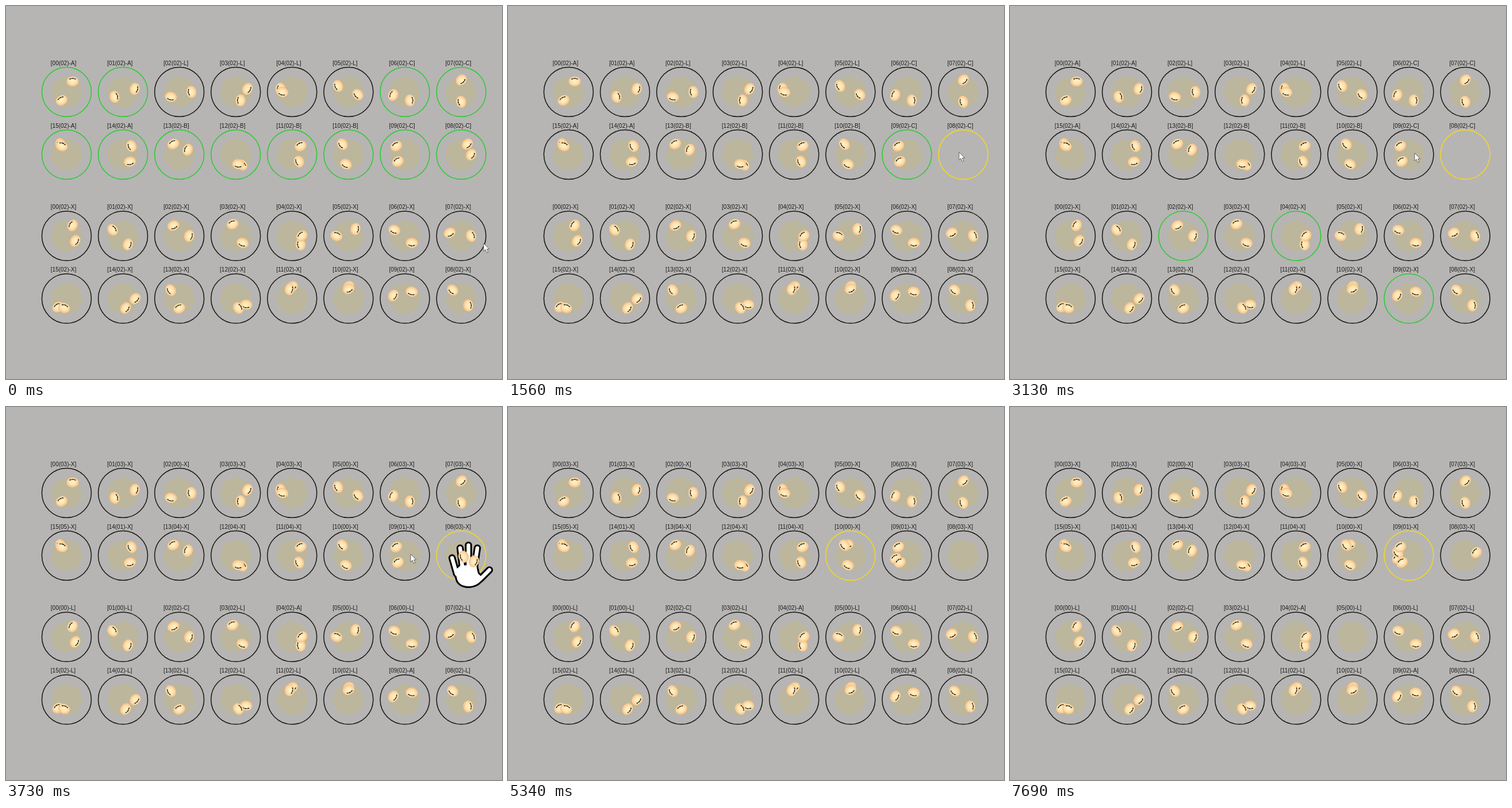
These frames come from a looping animation (863x649 px, 8 s). An HTML page:

```html
<!DOCTYPE html>
<html lang="en">
<head>
<meta charset="utf-8">
<title>Sowing game</title>
<style>
html, body { margin: 0; width: 100%; height: 100%; overflow: hidden; background: #b6b5b3; }
svg { display: block; width: 863px; height: 649px; }
text { font: 10px "Liberation Sans", Arial, sans-serif; fill: #1c1c1c; }
</style>
</head>
<body>
<svg id="stage" viewBox="0 0 863 649">
  <defs>
    <radialGradient id="skin" cx=".5" cy=".45" r=".58">
      <stop offset="0" stop-color="#fff2cb"/>
      <stop offset=".5" stop-color="#fde3b0"/>
      <stop offset="1" stop-color="#f4b87c"/>
    </radialGradient>
    <g id="bean">
      <ellipse rx="10.6" ry="8.8" fill="url(#skin)"/>
      <path d="M-5.5-3.8Q0-7 5.5-3.8" fill="none" stroke="#14100c" stroke-width="1.4" stroke-dasharray="3.2 .7 4.4 .6"/>
    </g>
    <path id="fingers" d="M-16 4L-8 32M-2-13L2 20M12.5-18V20M28-13L23 20M49 25L33 41" fill="none" stroke-linecap="round"/>
    <path id="palm" d="M-11 26L-1 17H26L29 31L34 36L37 40Q29 53 13 53.5Q-3 53-7 42Z" stroke-linejoin="round"/>
    <g id="handShape">
      <use href="#fingers" stroke="#000" stroke-width="12.5"/>
      <use href="#palm" stroke="#000" stroke-width="6"/>
      <use href="#fingers" stroke="#fff" stroke-width="6.5"/>
      <use href="#palm" fill="#fff"/>
    </g>
  </defs>
</svg>
<script>
const LOOP = 8000;
const BLACK = '#161616', GREEN = '#2bc92f', YELLOW = '#f6d91c';
const CHOOSE = 1450, REPLY = 3050, RESET = 3400, SOW = 3730;
const FIRST = 15, NEXT = 14;
const stage = document.getElementById('stage');

function add(parent, tag, attrs = {}) {
  const el = document.createElementNS('http://www.w3.org/2000/svg', tag);
  for (const k in attrs) el.setAttribute(k, attrs[k]);
  parent.appendChild(el);
  return el;
}
const show = (el, on) => el.setAttribute('visibility', on ? 'visible' : 'hidden');
const within = (t, a, b) => t >= a && t < b;

let seed = 7;
function random() {
  seed = seed * 16807 % 2147483647;
  return seed / 2147483647;
}

const [board, sownLayer, base, handLayer, pointer] =
  Array.from({ length: 5 }, () => add(stage, 'g'));

function center(i) {
  const row = i >> 3;
  return [105.4 + 98.1 * (i % 8), 149.5 + 109 * row + (row > 1 ? 32.5 : 0)];
}

// A bean lies in its hole like a mark on a clock face
function placeBean(layer, hole, hour, r) {
  const [cx, cy] = center(hole), a = hour * Math.PI / 6;
  const x = cx + r * Math.sin(a), y = cy - r * Math.cos(a);
  return add(layer, 'use', { href: '#bean', transform: `translate(${x} ${y}) rotate(${random() * 360})` });
}

// Clock hours of the two beans in each hole
const hours = [
  [1, 7, 2.5, 8, 3, 8, 2.5, 5, 9.5, 9, 10, 3.5, 8.5, 5, 0, 6],
  [11, 11, 1.5, 4.5, 11, 2, 5, 5.5, 1.5, 4.5, 11, 6.5, 10.5, 7.5, 1, 3],
  [1, 4, 10, 5, 11, 3, 11.5, 4.5, 4.5, 3, 9, 1.5, 10, 4.5, 9.5, 3],
  [7.5, 6.5, 3, 5.5, 10.5, 6, 4, 5.5, 0, 11.5, 0, 0, 9.5, 1.5, 10.5, 4.5]
].flat();

const holes = Array.from({ length: 32 }, (_, i) => {
  const [cx, cy] = center(i), col = i % 8;
  return {
    number: String((i >> 3) % 2 ? 15 - col : col).padStart(2, '0'),
    disc: add(board, 'circle', { cx, cy, r: 27, fill: '#bcb69d' }),
    ring: add(board, 'circle', { cx, cy, r: 43, fill: 'none', 'stroke-width': 1.5 }),
    label: add(board, 'text', { x: cx - 27.6, y: cy - 46.7 }),
    beans: [placeBean(base, i, hours[2 * i], 21), placeBean(base, i, hours[2 * i + 1], 17)]
  };
});

// Each step marks a hole; two beans in hand means it was just emptied,
// fewer means one was dropped there at the given hour
const steps = [
  { at: SOW, hole: 15, inHand: 2 },
  { at: 4460, hole: 14, inHand: 1, hour: 8.5 },
  { at: 5260, hole: 13, inHand: 0, hour: 11.5 },
  { at: 6080, hole: 21, inHand: 2 },
  { at: 6880, hole: 15, inHand: 1, hour: 2.5 },
  { at: 7690, hole: 14, inHand: 0, hour: 9.5 }
];
const sown = steps.filter(s => s.inHand < 2)
  .map(s => ({ el: placeBean(sownLayer, s.hole, s.hour, 20), from: s.at, to: LOOP }));
sown.push({ el: placeBean(sownLayer, NEXT, 10, 34), from: 1780, to: 2630 });

const hand = add(handLayer, 'g');
add(hand, 'use', { href: '#handShape' });
const held = [0, 1].map(k => add(hand, 'use', {
  href: '#bean', transform: `translate(${4 + 18 * k} ${2 + 8 * k}) rotate(${250 - 140 * k})`
}));

const glow = add(pointer, 'circle', { cx: 0, cy: 1.5, r: 10.5, fill: '#f8e01c', opacity: .85 });
const arrow = add(pointer, 'path', {
  d: 'M0 0V13.6L3.2 10.7L5.5 16.2L8 15.2L5.7 9.9H9.8Z',
  fill: '#fff', stroke: '#55555c', 'stroke-width': .9, 'stroke-linejoin': 'round'
});

const moves = [
  { from: 0, to: 70, x: 843, y: 392 },
  { from: 350, to: 740, x: 787, y: 240 },
  { from: 740, to: 870, x: 807, y: 254 },
  { from: CHOOSE, to: 1780, x: 696, y: 256 },
  { from: 2630, to: 2770, x: 704, y: 256 },
  { from: 4400, to: 4610, x: 900, y: 338 }
];

// The pointer advances in ticks of about 65 ms
function pointerAt(t) {
  let x = 831, y = 413;
  for (const m of moves) {
    if (t < m.from) break;
    const ticks = Math.round((m.to - m.from) / 65);
    const f = Math.min(1, Math.floor((t - m.from) / (m.to - m.from) * ticks) / ticks);
    x += (m.x - x) * f;
    y += (m.y - y) * f;
  }
  return [x, y];
}

const before = {
  counts: '2'.repeat(32),
  kinds: 'AALLLLCC' + 'AABBBBCC' + 'X'.repeat(16)
};
const after = {
  counts: '33033033' + '51444013' + '00222002' + '2'.repeat(8),
  kinds: 'X'.repeat(16) + 'LLCLALLL' + 'LLLLLLAL'
};

function isOpen(i, t) {
  if (t < CHOOSE) return i < 16 && before.kinds[i] !== 'L';
  if (t < REPLY) return i === NEXT;
  return t < SOW && i >= 16 && after.kinds[i] !== 'L';
}

function draw(t) {
  const step = steps.filter(s => s.at <= t).pop();
  const chosen = within(t, CHOOSE, RESET);
  const marked = step ? step.hole : chosen ? FIRST : -1;
  const text = t < SOW ? before : after;

  holes.forEach((h, i) => {
    const taken = chosen && i === FIRST;
    const emptied = steps.some(s => s.inHand === 2 && s.hole === i && s.at <= t);
    h.ring.setAttribute('stroke', i === marked ? YELLOW : isOpen(i, t) ? GREEN : BLACK);
    h.label.textContent = `[${h.number}(0${text.counts[i]})-${text.kinds[i]}]`;
    show(h.disc, !taken);
    h.beans.forEach(b => show(b, !taken && !emptied));
  });
  sown.forEach(b => show(b.el, within(t, b.from, b.to)));

  const inHand = step ? step.inHand : 0;
  hand.setAttribute('display', inHand ? 'inline' : 'none');
  if (inHand) hand.setAttribute('transform', `translate(${center(marked)})`);
  held.forEach((b, k) => show(b, k < inHand));

  pointer.setAttribute('transform', `translate(${pointerAt(t)})`);
  show(glow, within(t, 1360, CHOOSE) || within(t, 1780, 2630));
}

const start = performance.now();
function tick(now) {
  draw(Math.max(0, now - start) % LOOP);
  requestAnimationFrame(tick);
}
draw(0);
requestAnimationFrame(tick);
</script>
</body>
</html>
```
